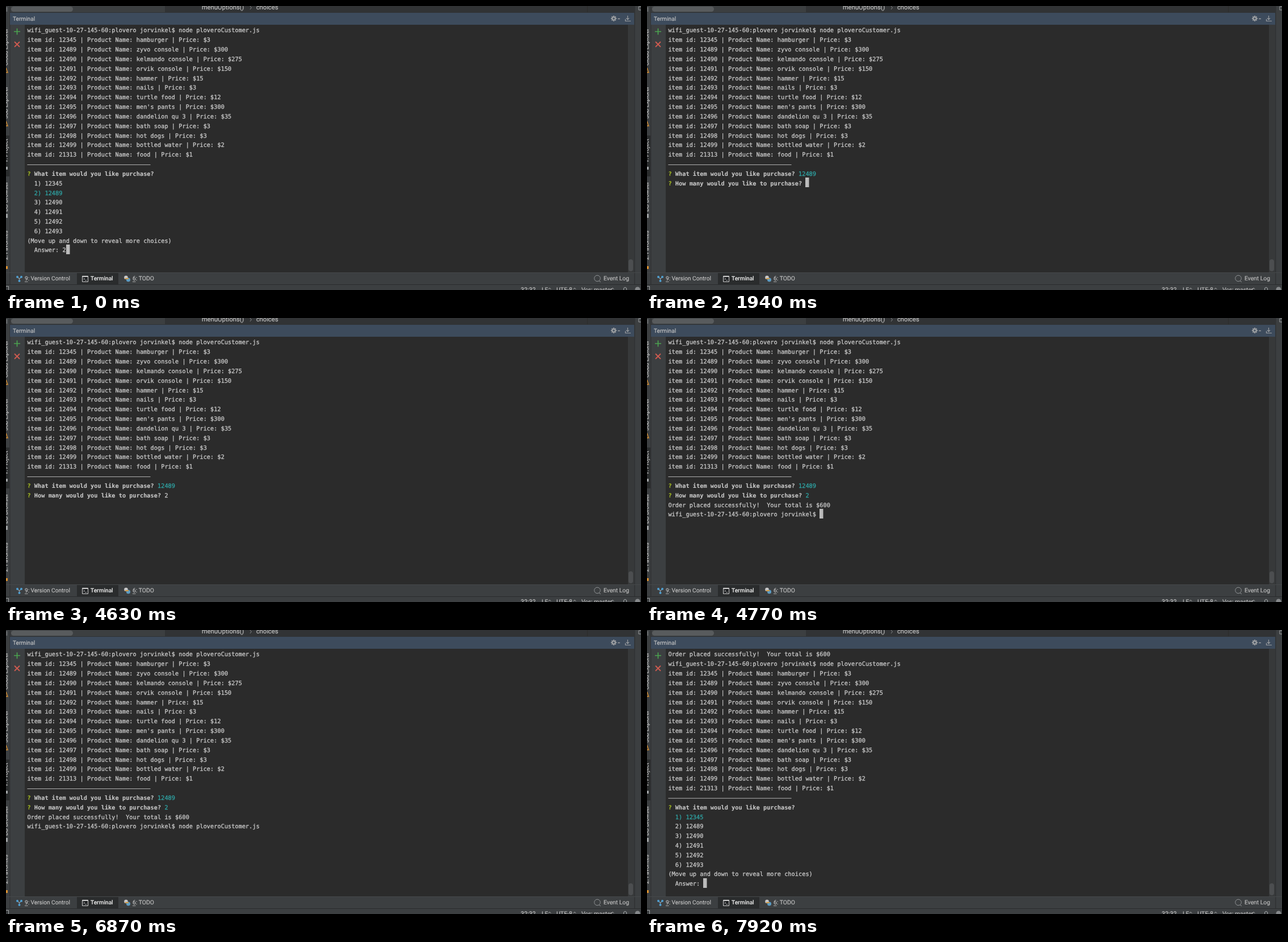
Write an HTML page with a canvas that moves like this. It is 1119 by 500 pixels and loops after 8000 ms.

```html
<!DOCTYPE html>
<html lang="en">
<head>
<meta charset="utf-8">
<title>Terminal session</title>
<style>
  html, body { margin: 0; width: 100%; height: 100%; overflow: hidden; background: #2b2b2b; }
  canvas { display: block; }
</style>
</head>
<body>
<canvas id="stage" width="1119" height="500"></canvas>
<script>
const ctx = document.getElementById('stage').getContext('2d');
ctx.textRendering = 'geometricPrecision';

const LOOP = 8000;
const CELL = 6.205, LINE = 16.83, LEFT = 37.4, TOP = 33.1, BASE = 46.4;
const GREY = '#c8c8c8', CYAN = '#2fa3a3', GREEN = '#a8c023';
const PANEL = '#3c3f41', DARK = '#2b2b2b', EDGE = '#303234', LABEL = '#c4c4c4';

const PROMPT = 'wifi_guest-10-27-145-60:plovero jorvinkel$ ';
const COMMAND = 'node ploveroCustomer.js';
const RECEIPT = 'Order placed successfully!  Your total is $600';
const ITEMS = [
  [12345, 'hamburger', 3], [12489, 'zyvo console', 300], [12490, 'kelmando console', 275],
  [12491, 'orvik console', 150], [12492, 'hammer', 15], [12493, 'nails', 3],
  [12494, 'turtle food', 12], [12495, "men's pants", 300], [12496, 'dandelion qu 3', 35],
  [12497, 'bath soap', 3], [12498, 'hot dogs', 3], [12499, 'bottled water', 2], [21313, 'food', 1]
];
const CURSOR_OFF = [[1050, 1490], [2540, 2990], [3430, 3580], [4630, 4770], [5820, 6270], [6870, 7320]];

function box(x, y, w, h, color, radius = 0) {
  ctx.fillStyle = color;
  ctx.beginPath();
  ctx.roundRect(x, y, w, h, radius);
  ctx.fill();
}

function stroke(path, color, width = 1) {
  ctx.strokeStyle = color;
  ctx.lineWidth = width;
  ctx.stroke(new Path2D(path));
}

function dot(x, y, r, color) {
  box(x - r, y - r, 2 * r, 2 * r, color, r);
}

// Fill plus a hairline outline gives the slightly heavy look of smoothed text
function ink(text, x, y, color, outline) {
  ctx.fillStyle = ctx.strokeStyle = color;
  ctx.lineWidth = outline;
  ctx.fillText(text, x, y);
  ctx.strokeText(text, x, y);
}

function label(text, x, y, size = 10.1, color = LABEL, weight = 400) {
  ctx.font = `${weight} ${size}px Roboto, sans-serif`;
  ink(text, x, y, color, 0.15);
}

function sideLabel(text, y) {
  ctx.save();
  ctx.translate(3, y);
  ctx.rotate(-Math.PI / 2);
  label(text, 0, 0);
  ctx.restore();
}

// Terminal text on a fixed character grid
function put(row, col, text, color = GREY, weight = 400) {
  ctx.font = `${weight} 10.31px "DejaVu Sans Mono", monospace`;
  const y = Math.round(BASE + row * LINE);
  [...text].forEach((c, i) => {
    if (c !== ' ') ink(c, LEFT + (col + i) * CELL, y, color, weight > 400 ? 0.1 : 0.3);
  });
}

function cursor(row, col) {
  box(Math.round(LEFT + col * CELL), Math.round(TOP + row * LINE), 6.5, 17, '#bbbbbb');
}

function question(row, text, answer = '', color = CYAN) {
  put(row, 0, '?', GREEN, 700);
  put(row, 2, text, GREY, 700);
  put(row, text.length + 3, answer, color);
}

function shop(row, answer) {
  ITEMS.forEach(([id, name, price], i) =>
    put(row + i, 0, `item id: ${id} | Product Name: ${name} | Price: $${price}`));
  box(LEFT, 43.4 + (row + 13) * LINE, 35 * CELL, 1, '#b0b0b0');
  question(row + 14, 'What item would you like purchase?', answer);
}

function choices(row, selected) {
  ITEMS.slice(0, 6).forEach(([id], i) =>
    put(row + i, 2, `${i + 1}) ${id}`, i === selected ? CYAN : GREY));
  put(row + 6, 0, '(Move up and down to reveal more choices)');
  put(row + 7, 2, 'Answer:');
}

function sidebars() {
  box(0, 228, 6, 72, '#2a2c2d');
  sideLabel('Cloud Explorer', 105);
  sideLabel('Job Explorer', 198);
  sideLabel('1: Project', 276);
  sideLabel('DB Browser', 362);
  sideLabel('2: Favorites', 447);
  for (const y of [113, 207]) stroke(`M0 ${y - 4}L3 ${y + 4}H0`, '#d9902f', 1.3);
  box(0, 283, 3, 5, '#9da0a2');
  box(0, 366, 3, 7, '#9da0a2');
  box(0, 458, 3, 5, '#d9902f');
  stroke('M1.5 2V10', '#8d9092');
  box(6, 0, 1.5, 490, EDGE);
  box(1107, 0, 1.5, 490, EDGE);
  stroke('M1119 1H1115V7H1119', '#9da0a2');
}

function topBars() {
  box(280, 0, 827, 11, '#313335');
  box(9, 1, 109, 9, '#585b5d', 4.5);
  box(1024, 0, 1, 11, DARK);
  label('menuOptions()', 345, 6, 11.2);
  stroke('M430 0L432.5 3L430 6', '#85888a');
  label('choices', 441, 6, 11.2);
  box(7, 11, 1100, 1, EDGE);
  box(7, 12, 1100, 21, '#3d4b5c');
  label('Terminal', 12, 25.7);

  for (let i = 0; i < 8; i++) {
    const a = i * Math.PI / 4, x = Math.cos(a), y = Math.sin(a);
    stroke(`M${1071 + 2 * x} ${22 + 2 * y}L${1071 + 5 * x} ${22 + 5 * y}`, '#9a9da0', 2);
  }
  dot(1071, 22, 3.6, '#9a9da0');
  dot(1071, 22, 1.5, '#3d4b5c');
  stroke('M1078 22.5H1082', '#9a9da0', 1.4);
  stroke('M1095.5 17V24M1093 21.5L1095.5 24L1098 21.5M1091.5 23V26.5H1101', '#9a9da0', 1.2);
}

function bottomBars() {
  box(0, 469, 1119, 1, '#45484a');
  box(125, 470, 73, 20, '#2a2c2d');
  stroke('M20 477L23.5 480.5L27 477M23.5 480V485', '#8fa1ad', 1.2);
  dot(20, 477, 2, '#4f9fd0');
  dot(27, 477, 2, '#4f9fd0');
  dot(23.5, 484, 2, '#4f9fd0');
  label('9: Version Control', 33, 483.3);
  stroke('M33 485.5H38.5M223 485.5H228.5', LABEL, 0.8);

  box(134, 475, 11, 11, '#d0d0d0', 1);
  box(135, 477, 9, 8, '#222426');
  stroke('M136.5 478.5L138.5 480.5L136.5 482.5M139.5 483H142', '#d0d0d0');
  label('Terminal', 149, 483.3, 10.1, '#e6e6e6', 500);

  dot(211.5, 478, 3.3, '#c8c8c8');
  dot(215.5, 482, 3.5, '#5d9cc2');
  box(210, 479, 6, 2, '#d19a45');
  label('6: TODO', 223, 483.3, 10.4);

  ctx.beginPath();
  ctx.arc(1042, 479.5, 5.3, 0, 7);
  ctx.strokeStyle = '#8f9294';
  ctx.lineWidth = 1;
  ctx.stroke();
  stroke('M1045 484L1048 486', '#8f9294');
  label('Event Log', 1053, 483.3, 10.3);

  box(0, 490, 1119, 1, '#2a2c2d');
  stroke('M0 493.5H4.5V500', '#a0a3a5');
  label('32:32', 907, 502.5, 10.6);
  label('LF', 944, 502.5, 10.3);
  label('UTF-8', 970, 502.5, 10.6);
  label('Vcs: master', 1014, 502.5, 10.3);
  for (const x of [958, 1002, 1069]) stroke(`M${x - 2} 498.5L${x} 496.5L${x + 2} 498.5`, LABEL);
  stroke('M1088.5 500V497.5Q1091 493 1093.5 497.5V500', '#a0a3a5', 1.2);
  dot(1113, 499, 4.5, '#85888a');
}

function frameWindow() {
  box(0, 0, 1119, 500, PANEL);
  box(33, 33, 1074, 436, DARK);
  sidebars();
  topBars();
  bottomBars();
  stroke('M14 45H25M19.5 39.5V50.5', '#4ba34f', 1.7);
  stroke('M15 63L24 72M24 63L15 72', '#cf5b50', 1.8);
  box(1096, 33, 11, 436, '#37393a');
  box(1097, 446, 8, 21, '#4c4e50', 4);
}

function session(t) {
  if (t >= 7920) {
    put(0, 0, RECEIPT);
    put(1, 0, PROMPT + COMMAND);
    shop(2);
    choices(17, 0);
    return [24, 10];
  }
  put(0, 0, PROMPT + COMMAND);
  shop(1, t < 1940 ? '' : '12489');
  if (t < 1940) {
    choices(16, 1);
    put(23, 10, '2');
    return [23, 11];
  }
  const typed = t >= 3580, ordered = t >= 4770;
  question(16, 'How many would you like to purchase?', typed ? '2' : '', ordered ? CYAN : GREY);
  if (!ordered) return [16, typed ? 40 : 39];

  put(17, 0, RECEIPT);
  put(18, 0, PROMPT + (t < 6420 ? '' : COMMAND));
  if (t < 6420) return [18, PROMPT.length];
  return t < 7470 ? [18, PROMPT.length + COMMAND.length + 1] : [19, 0];
}

function draw(now) {
  const t = now % LOOP;
  frameWindow();
  const place = session(t);
  if (!CURSOR_OFF.some(([from, to]) => t >= from && t < to)) cursor(...place);
  requestAnimationFrame(draw);
}
requestAnimationFrame(draw);
</script>
</body>
</html>
```
